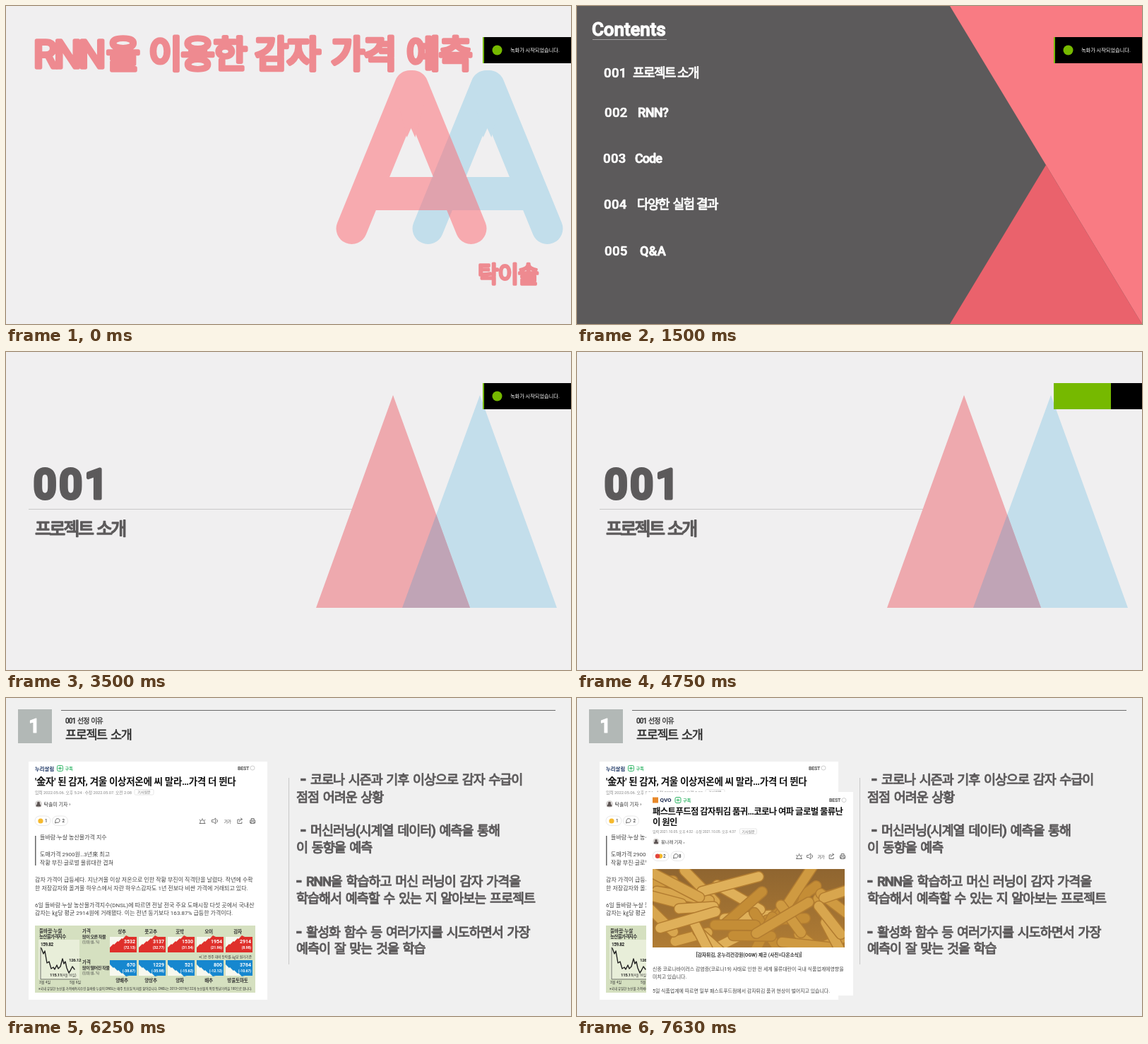
An HTML page that plays this animation: 800x450 px, repeating every 8 s.

```html
<!DOCTYPE html>
<html lang="ko">
<head>
<meta charset="utf-8">
<style>
html, body { margin: 0; width: 100%; height: 100%; overflow: hidden; background: #f0eff0; }
svg { display: block; width: 800px; height: 450px; }
text { font-family: Roboto, "Noto Sans CJK KR", sans-serif; white-space: pre; }
.round { stroke-linejoin: round; stroke-linecap: round; }
</style>
</head>
<body>
<svg id="stage" viewBox="0 0 800 450" xmlns="http://www.w3.org/2000/svg"></svg>
<script>
const LOOP = 8000;
const INK = '#5c5a5b', PAPER = '#f0eff0', ROSE = '#ee8a90', GREEN = '#76b900';

const rect = (x, y, w, h, fill, more = '') =>
  `<rect x="${x}" y="${y}" width="${w}" height="${h}" fill="${fill}" ${more}/>`;
const poly = (points, fill) => `<polygon points="${points}" fill="${fill}"/>`;
const disc = (x, y, r, fill, more = '') =>
  `<circle cx="${x}" cy="${y}" r="${r}" fill="${fill}" ${more}/>`;
const line = (d, color, w = 1) =>
  `<path class="round" d="${d}" fill="none" stroke="${color}" stroke-width="${w}"/>`;
const group = (id, body) => `<g id="${id}">${body}</g>`;

function text(x, y, size, str, fill = '#444', o = {}) {
  const outline = o.fat ? `stroke="${fill}" stroke-width="${o.fat}"` : '';
  return `<text class="round" x="${x}" y="${y}" font-size="${size}" fill="${fill}" ${outline}
    font-weight="${o.weight || 400}" letter-spacing="${o.ls || 0}" word-spacing="${o.ws || 0}"
    text-anchor="${o.anchor || 'start'}">${str}</text>`;
}
const bold = (x, y, size, str, fill, o = {}) => text(x, y, size, str, fill, { weight: 700, ...o });

// Places the words of one heading at their own left edges.
const words = (y, size, fill, o, list) =>
  list.map(([x, str]) => bold(x, y, size, str, fill, o)).join('');

function cover() {
  const letter = `<path class="round" d="M489.5 315L572 113H576L658.5 315" fill="none"
    stroke="currentColor" stroke-width="44"/>` + rect(520, 242, 108, 47, 'currentColor') +
    poly('556,140 592,140 579.3,186 573.5,173 567.7,186', 'currentColor');
  const o = { weight: 400, fat: 5.5, ls: -2 };
  return rect(0, 0, 800, 450, PAPER) +
    `<g color="#c2deeb" transform="translate(108)">${letter}</g>` +
    `<g color="#ff6770" opacity=".5">${letter}</g>` +
    words(87, 52, ROSE, o, [[142, '을'], [202, '이용한'], [352, '감자'], [460, '가격'], [567, '예측']]) +
    bold(39, 87, 54, 'RNN', ROSE, { ...o, ls: -4 }) +
    bold(668, 391, 32, '탁이솔', ROSE, { weight: 400, fat: 3.4, ls: -1 });
}

function contents() {
  const o = { weight: 500, fat: .9, ls: -1.6 };
  const rows = [
    [38, 101, [[79, '프로젝트'], [142, '소개']], o.ls],
    [39, 157, [[86, 'RNN?']], -.6],
    [37, 222, [[82, 'Code']], -1],
    [38, 287, [[85, '다양한'], [135.5, '실험'], [169, '결과']], o.ls],
    [39, 353, [[89, 'Q&amp;A']], .4]
  ];
  return rect(0, 0, 800, 450, INK) +
    poly('528,0 800,0 800,450', '#f97b83') +
    poly('664,225 800,450 528,450', '#ea626c') +
    bold(21, 42, 26, 'Contents', '#fff', { weight: 500, fat: 1.4, ls: -.1 }) +
    rect(22, 47, 105, 1, '#a5a3a4') +
    rows.map(([x, y, list, ls], i) =>
      bold(x, y, 18.5, '00' + (i + 1), '#fff', { weight: 500, fat: .7, ls: .4 }) +
      words(y, 18, '#fff', { ...o, ls }, list)).join('');
}

function chapter() {
  return rect(0, 0, 800, 450, PAPER) +
    rect(32, 222, 460, 1, '#c9c9c9') +
    poly('671,61 561,362 780,362', '#c3deeb') +
    poly('548,61 439,362 657,362', '#eea9ae') +
    poly('609.3,230 561,362 657,362', '#c0a4b6') +
    bold(39, 207, 57, '001', INK, { weight: 500, fat: 5, ls: 4 }) +
    words(259, 25, INK, { weight: 500, fat: 1.6, ls: -2.7 }, [[41, '프로젝트'], [128, '소개']]);
}

function intro() {
  const o = { weight: 500, fat: 1, ls: -1, ws: 2 };
  const bullets = [
    [431, 122, '코로나 시즌과 기후 이상으로 감자 수급이', 416],
    [411, 147, '점점 어려운 상황'],
    [431, 194, '머신러닝(시계열 데이터) 예측을 통해', 416],
    [411, 218, '이 동향을 예측'],
    [425, 266, 'RNN을 학습하고 머신 러닝이 감자 가격을', 410],
    [411, 290, '학습해서 예측할 수 있는 지 알아보는 프로젝트'],
    [425, 338, '활성화 함수 등 여러가지를 시도하면서 가장', 410],
    [411, 361, '예측이 잘 맞는 것을 학습']
  ];
  return rect(0, 0, 800, 450, '#f0f0f0') +
    rect(17, 16, 48, 48, '#b2b8b6') +
    bold(40, 49, 27, '1', '#fff', { fat: 1.2, anchor: 'middle' }) +
    rect(78, 17, 700, 1, '#6a6a6a') +
    text(84, 35.5, 10, '001 선정 이유', '#333', { weight: 500, fat: .3, ls: -.9, ws: 1 }) +
    words(58, 17.5, '#333', { weight: 500, fat: .6, ls: -1.4 }, [[84, '프로젝트'], [148, '소개']]) +
    rect(400, 113, 1, 264, '#c8c8c8') +
    bullets.map(([x, y, str, dash]) =>
      (dash ? bold(dash, y + 1, 25, '-', INK, { fat: .6 }) : '') + bold(x, y, 18.5, str, INK, o)).join('');
}

// Shared furniture of the two news clippings.
const subscribe = (x, y) =>
  rect(x, y, 8, 8, '#fff', 'rx="2" stroke="#2fb565"') +
  line(`M${x + 2} ${y + 4}h4m-2-2v4`, '#2fb565') +
  bold(x + 11, y + 6.7, 6.2, '구독', '#2fb565');
const badge = (x, y) =>
  bold(x, y, 7, 'BEST', '#555', { ls: -.2 }) +
  disc(x + 21, y - 2.5, 3, '#fff', 'stroke="#bbb" stroke-width=".7"');
const tag = (x, y, w) =>
  rect(x, y, w, 7.5, '#fff', 'rx="1.5" stroke="#ddd" stroke-width=".7"') +
  text(x + w / 2, y + 5.7, 5, '기사원문', '#777', { anchor: 'middle' });
const writer = (x, y, r, size, name) =>
  disc(x, y, r, '#d8d5d3') + disc(x, y - 1.2, r * .4, '#5b5352') +
  `<path d="M${x - r * .7} ${y + r * .7}a${r * .7} ${r * .75} 0 0 1 ${r * 1.4} 0z" fill="#5b5352"/>` +
  text(x + r + 2.5, y + 2.5, size, name + ' 기자 ›', '#333');
const pill = (x, y, w, body, count) =>
  rect(x, y, w, 13.5, '#fff', 'rx="6.7" stroke="#e2e2e2" stroke-width=".8"') + body +
  text(x + w - 8, y + 9.3, 6.3, count, '#444', { weight: 500 });
const bubble = (x, y) => line(`M${x} ${y}a3 2.8 0 1 1 2 2.6l-2 .8z`, '#444', .8);

function tools(x, y, step) {
  const at = (i, d) => `<g transform="translate(${x + i * step} ${y})">${line(d, '#666', .9)}</g>`;
  return at(0, 'M-4 3.5h8M-3 3.5v-2a3 3 0 0 1 6 0v2M0 -3.5v1M-4 -1.5l1 .5M4 -1.5l-1 .5') +
    at(1, 'M-4 -1.5h2l3 -2.5v8l-3 -2.5h-2zM3 -2q2 2 0 4') +
    text(x + 2 * step, y + 2.8, 6, '가가', '#555', { weight: 500, anchor: 'middle', ls: -.6 }) +
    at(3, 'M-1 -2h-2.5v5.5h6v-2M-1 1q0 -3.5 4 -3.5m-2 -1.5l2 1.5l-2 1.5') +
    at(4, 'M-2 -1v-2.5h4v2.5M-2 3h-1.5v-4h7v4h-1.5M-2 1h4v2.5h-4z');
}

function tile(i, up, price, rate, label) {
  const x = 147 + i * 41, y = up ? 338 : 371, w = 38, h = 22;
  const color = up ? '#df302b' : '#1687cf';
  const edge = [0, 1, 2, 3].map(k => {
    const px = x + k * 6, py = up ? y + 15 - k * 4 : y + 6 + k * 4;
    return `${px},${py} ${px + 5},${py + (up ? -5 : 5)}`;
  }).join(' ');
  const far = up ? y : y + h, near = up ? y + h : y;
  return rect(x, y, w, h, '#f7f8ef') +
    poly(`${edge} ${x + 27},${far} ${x + w},${far} ${x + w},${near} ${x},${near}`, color) +
    bold(x + w - 2, y + 9, 7, price, '#fff', { anchor: 'end' }) +
    bold(x + w - 2, y + 17, 5.4, `(${rate})`, '#fff', { anchor: 'end', ls: -.2 }) +
    bold(x + w / 2 - 2, up ? 333 : 402, 6.6, label, '#333', { anchor: 'middle', ls: -.2 });
}

function priceChart() {
  const up = [['3532', '72.13', '상추'], ['3137', '32.77', '풋고추'], ['1530', '31.54', '호박'],
    ['1954', '21.96', '오이'], ['2914', '8.98', '감자']];
  const down = [['670', '-38.67', '양배추'], ['1229', '-35.98', '양상추'], ['521', '-15.62', '양파'],
    ['800', '-12.12', '배추'], ['3764', '-10.67', '방울토마토']];
  const legend = (y, what) => bold(108, y, 6.4, '가격', '#333') +
    bold(108, y + 8, 6.2, what, '#333', { ls: -.5 }) + text(108, y + 14.5, 5, '(단위:원, %)', '#444');
  return rect(41, 322, 312, 95, '#d5e0c0') +
    rect(46, 342, 58, 56, '#e8eed9') +
    bold(47, 332, 6.6, '들바람·누살', '#333') +
    bold(47, 340, 6.6, '농산물가격지수', '#333', { ls: -.7 }) +
    bold(49, 351, 6.4, '159.82', '#222', { ls: -.4 }) +
    line('M49 353V398H102', '#555', .8) +
    line('M50 354l3 8 2-4 3 17 3-2 3 10 3-2 2 3 3-6 2 5 3-3 3-11 2 7 2-3 2 9 3 7 2-3 3-6 3 4', '#222', 1.4) +
    bold(89, 373, 6.2, '126.12', '#222', { ls: -.4 }) +
    bold(62, 394, 6, '115.11', '#222', { ls: -.3 }) + text(79, 394, 4.6, '(4월 16일)', '#333') +
    text(47, 404, 5, '3월 4일', '#333') + text(90, 404, 5, '5월 6일', '#333') +
    legend(332, '많이 오른 작물') + legend(376, '많이 떨어진 작물') +
    up.map((d, i) => tile(i, true, ...d)).join('') +
    down.map((d, i) => tile(i, false, ...d)).join('') +
    text(348, 367.5, 4.7, '※( )은 전주 대비 등락률, ㎏당 원가기준', '#333', { anchor: 'end' }) +
    text(46, 413, 4.5, '※국내 유일한 농산물 가격예측지수인 들바람·누살의 DNSL는 매주 토요일 독자를 찾아갑니다. ' +
      'DNSL는 2013~2019년 22개 농산물의 적정 평균가격을 100으로 합니다.', '#333', { ls: -.05 });
}

function priceNews() {
  const body = [
    [48, 200, '들바람·누살 농산물가격 지수'],
    [48, 224, '도매가격 2900원…3년來 최고'],
    [48, 236, '작황 부진·글로벌 물류대란 겹쳐'],
    [41, 260, '감자 가격이 급등세다. 지난겨울 이상 저온으로 인한 작황 부진이 직격탄을 날렸다. 작년에 수확'],
    [41, 272, '한 저장감자와 올겨울 하우스에서 자란 하우스감자도 1년 전보다 비싼 가격에 거래되고 있다.'],
    [41, 295.5, '6일 들바람·누살 농산물가격지수(DNSL)에 따르면 전날 전국 주요 도매시장 다섯 곳에서 국내산'],
    [41, 307, '감자는 ㎏당 평균 2914원에 거래됐다. 이는 전년 동기보다 163.87% 급등한 가격이다.']
  ];
  return rect(32, 90, 338, 337, '#fff') +
    bold(41, 102.5, 7.4, '누리살림', '#1c3564') + subscribe(72.5, 95.5) + badge(328, 101.5) +
    bold(41, 123, 13.5, "'金자' 된 감자, 겨울 이상저온에 씨 말라…가격 더 뛴다", '#111', { ls: -.3 }) +
    text(41, 135.5, 5.9, '입력 2022.05.06. 오후 5:24 · 수정 2022.05.07. 오전 2:08', '#888', { ls: -.1 }) +
    tag(182, 129.5, 27) +
    writer(46, 150, 5, 7, '탁솔미') +
    pill(41, 167, 22, disc(49, 174, 3.6, '#f6b92c'), '1') +
    pill(65.5, 167, 22, bubble(70, 173.5), '2') +
    tools(278, 174, 17.8) +
    rect(41, 195, 1.5, 42, '#666') +
    body.map(([x, y, str]) => text(x, y, 8, str, '#444', { ls: .02 })).join('') +
    priceChart();
}

function friesPhoto() {
  let seed = 11;
  const rnd = () => (seed = seed * 16807 % 2147483647) / 2147483647;
  const tones = ['#cf9a41', '#d8a64e', '#dfb05a', '#c48d36'];
  let fries = '';
  for (let i = 0; i < 34; i++) {
    const x = 107 + (i * 67) % 280, y = 262 + rnd() * 92;
    const a = (rnd() - .5) * 2.2, len = 22 + rnd() * 22;
    const dx = Math.cos(a) * len, dy = Math.sin(a) * len;
    const d = `M${x - dx} ${y - dy}L${x + dx} ${y + dy}`;
    fries += line(d, '#b27c30', 16) + line(d, tones[i % 4], 13);
  }
  return `<defs><linearGradient id="oil" x2="0" y2="1"><stop stop-color="#8f6530"/>
    <stop offset="1" stop-color="#b07c34"/></linearGradient>
    <clipPath id="photo">${rect(107, 242, 272, 111, '#000')}</clipPath></defs>
    <g clip-path="url(#photo)">${rect(107, 242, 272, 111, 'url(#oil)')}${fries}</g>`;
}

function friesNews() {
  const body = [
    [386, '신종 코로나바이러스 감염증(코로나19) 사태로 인한 전 세계 물류대란이 국내 식품업계에영향을'],
    [396.5, '미치고 있습니다.'],
    [417, '5일 식품업계에 따르면 일부 패스트푸드점에서 감자튀김 품귀 현상이 벌어지고 있습니다.']
  ];
  return rect(98, 133, 293, 288, '#fff') +
    rect(107, 140.5, 8, 8, '#e8892b') + bold(117.5, 147.3, 8, 'QVO', '#1d2b50') +
    subscribe(139, 140.5) + badge(357, 147) +
    bold(107, 165, 12.4, '패스트푸드점 감자튀김 품귀…코로나 여파 글로벌 물류난', '#111', { ls: -.6 }) +
    bold(107, 179.5, 12.4, '이 원인', '#111', { ls: -.6 }) +
    text(107, 190.5, 5.1, '입력 2021.10.05. 오후 4:32 · 수정 2021.10.05. 오후 4:37', '#888', { ls: -.1 }) +
    tag(230.5, 185, 24) +
    writer(112, 203, 4.5, 6.2, '봉나래') +
    pill(107, 217, 23, disc(118, 223.7, 3.2, '#f6b92c') + disc(114, 223.7, 3.2, '#e2453c'), '2') +
    pill(133, 217, 19, bubble(137, 223.5), '8') +
    tools(314.5, 224, 15.4) +
    friesPhoto() +
    bold(243.5, 365.5, 6.7, '[감자튀김, 온누리건강원(OGW) 제공 (사진=다온소식)]', '#333', { anchor: 'middle' }) +
    body.map(([y, str]) => text(107, y, 6.95, str, '#444')).join('');
}

const toast = () => rect(675, 44, 125, 37, '#000') +
  `<g id="toastBody">${disc(695.5, 62.5, 7, GREEN)}${text(714, 65.2, 7.2, '녹화가 시작되었습니다.', '#fff')}</g>` +
  rect(675, 44, 2, 37, GREEN, 'id="sweep"');

document.getElementById('stage').innerHTML =
  group('cover', cover()) + group('contents', contents()) + group('chapter', chapter()) +
  group('intro', intro()) + group('priceNews', priceNews()) + group('friesNews', friesNews()) +
  group('toast', toast());

const $ = id => document.getElementById(id);
const spans = {
  cover: [0, 1130], contents: [1130, 3000], chapter: [3000, 5130], intro: [5130, LOOP],
  priceNews: [6250, LOOP], friesNews: [7000, LOOP], toast: [0, 5000], toastBody: [0, 4750]
};
// Green bar of the notice: [from time, left edge, width]
const sweep = [[0, 675, 2], [4750, 675, 81], [4880, 716, 84]];

function draw(t) {
  for (const id in spans) {
    const [from, to] = spans[id];
    $(id).style.display = t >= from && t < to ? '' : 'none';
  }
  const [, x, w] = sweep.filter(s => t >= s[0]).pop();
  $('sweep').setAttribute('x', x);
  $('sweep').setAttribute('width', w);
  const back = $('toast').firstElementChild;
  back.setAttribute('x', x);
  back.setAttribute('width', 800 - x);
}

const start = performance.now();
function tick() {
  draw((performance.now() - start) % LOOP);
  requestAnimationFrame(tick);
}
tick();
</script>
</body>
</html>
```
